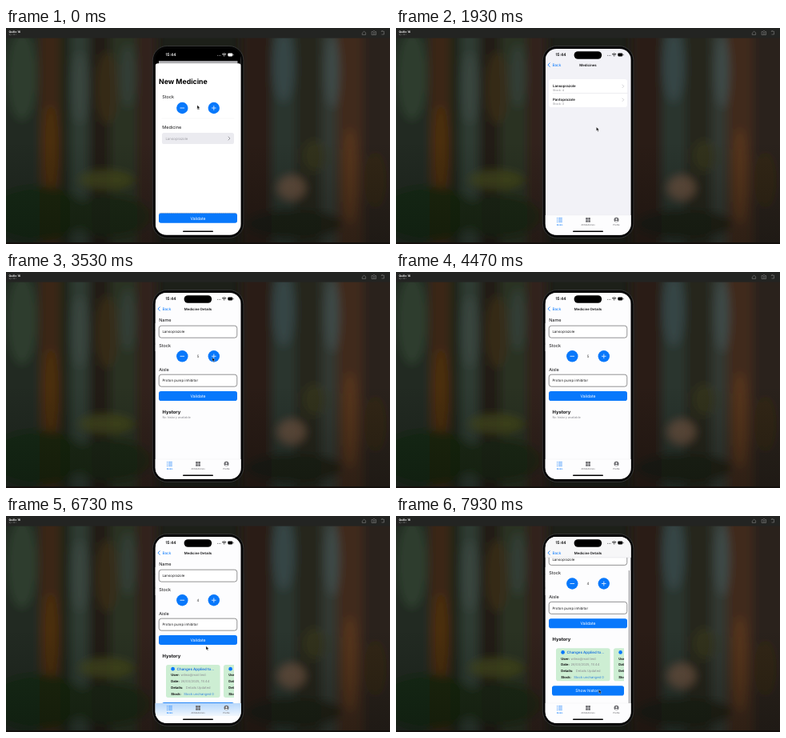
Recreate the animation shown at these times as an HTML page. Size 480 px wide and 270 px high, loop 8 s.

```html
<!DOCTYPE html>
<html lang="en">
<head>
<meta charset="utf-8">
<title>Medicine stock</title>
<style>
html, body { margin: 0; width: 100%; height: 100%; overflow: hidden; background: #0c100b; }
svg { display: block; width: 100vw; height: 100vh; }
text { font-family: Inter, Roboto, "Liberation Sans", sans-serif; white-space: pre; text-rendering: geometricPrecision; }
</style>
</head>
<body>
<svg id="stage" viewBox="0 0 480 270"></svg>
<script>
const LOOP = 8000, BLUE = '#0878fb', INK = '#101012', GREY = '#8b8b90';

const rect = (x, y, w, h, r, fill, extra = '') =>
  `<rect x="${x}" y="${y}" width="${w}" height="${h}" rx="${r}" fill="${fill}" ${extra}/>`;
const circle = (x, y, r, fill, extra = '') => `<circle cx="${x}" cy="${y}" r="${r}" fill="${fill}" ${extra}/>`;
const line = (d, color, width = .6, extra = '') =>
  `<path d="${d}" fill="none" stroke="${color}" stroke-width="${width}" stroke-linecap="round" stroke-linejoin="round" ${extra}/>`;
// y is the middle of the capital letters
const label = (x, y, size, str, fill = INK, weight = 400, anchor = 'start', extra = '') =>
  `<text x="${x}" y="${y + size * .36}" font-size="${size}" fill="${fill}" font-weight="${weight}" text-anchor="${anchor}" ${extra}>${str}</text>`;
const group = (id, body, extra = '') => `<g id="${id}" ${extra}>${body}</g>`;

// the whole phone display
const screen = (fill, r = 0, extra = '') => rect(186.7, 26, 107, 232.8, r, fill, extra);

const button = (x, y, w, h, str) =>
  rect(x, y, w, h, 2.8, BLUE) + label(x + w / 2, y + h / 2, 5.1, str, '#fff', 400, 'middle');
const field = (y, str) =>
  rect(191.2, y, 97.6, 15, 3, '#fff', 'stroke="#4a4a4c" stroke-width=".6"') + label(195.4, y + 7.7, 4.4, str);
const stepper = (y, id) =>
  circle(220.3, y, 7.2, BLUE) + circle(259.8, y, 7.2, BLUE) +
  line(`M217.9 ${y}h4.8M257.4 ${y}h4.8M259.8 ${y - 2.4}v4.8`, '#fff', .75) +
  label(240, y, 4.5, '0', '#333', 400, 'middle', `id="${id}"`);

function forest() {
  const trunks = [[-10, 52, '#222c20'], [42, 26, '#3a2515'], [68, 12, '#1f2318'], [80, 24, '#2f3a32'],
    [104, 26, '#241d13'], [130, 34, '#2b3024'], [164, 24, '#30241a'], [294, 38, '#2a1e15'],
    [332, 30, '#29342f'], [362, 32, '#26281f'], [394, 20, '#303930'], [414, 32, '#412a1b'], [446, 44, '#2a241b']];
  const patches = [[20, 60, 18, 55, '#324034'], [56, 150, 10, 55, '#50300f'], [92, 75, 11, 45, '#3a4842'],
    [126, 75, 14, 45, '#3b2d18'], [152, 60, 10, 40, '#33403a'], [40, 232, 60, 34, '#17290f'],
    [125, 190, 34, 12, '#444a1c'], [130, 235, 50, 26, '#1c2a12'], [347, 48, 13, 45, '#3a4a4c'],
    [357, 200, 17, 15, '#6e5541'], [408, 55, 9, 45, '#414f4d'], [430, 185, 9, 60, '#5c3820'],
    [385, 160, 14, 20, '#33361f'], [360, 245, 60, 18, '#1c1e12'], [462, 190, 14, 35, '#33261a']];
  return rect(0, 0, 480, 270, 0, '#1d2019') + `<g filter="url(#soft)">` +
    trunks.map(([x, w, c]) => rect(x, -20, w, 310, 0, c)).join('') +
    patches.map(([x, y, rx, ry, c]) =>
      `<ellipse cx="${x}" cy="${y}" rx="${rx}" ry="${ry}" fill="${c}" opacity=".8"/>`).join('') +
    `</g>` + rect(0, 12, 480, 258, 0, 'url(#dusk)');
}

function windowBar() {
  const c = '#8c8c8c';
  return rect(0, 0, 480, 12.6, 0, '#232422') + label(3.5, 4.6, 3.5, 'Quillo 16', '#f2f2f2', 700) +
    label(3.5, 8.5, 2.5, 'Sys 18.1', '#8a8a8a') +
    line('M445.6 6l2-2 2 2v2.4h-4zM457.5 4.5h1l.7-.8h1.6l.7.8h1v4h-5zM469.5 4.2h3v3.8h-2.6M469.5 4.2l1-1', c, .55) +
    circle(460, 6.4, 1, 'none', `stroke="${c}" stroke-width=".5"`) + rect(0, 268, 480, 2, 0, '#14100d');
}

function card(id, x, title, details, stock) {
  const rows = [['User:', 'wilma@mail.test', 12.2], ['Date:', '26/03/2025, 15:44', 12.2],
    ['Details:', details, 18.5], ['Stock:', stock, 16]];
  return group(id, rect(x, 186, 67.6, 41, 2.8, '#cdeed3') +
    circle(x + 8.6, 191.2, 2.3, BLUE) + label(x + 13.6, 191.2, 4.5, title, '#156fe0', 600) +
    rows.map(([key, value, dx], i) => {
      const y = 199 + i * 7.7;
      return label(x + 6.2, y, 4.1, key, INK, 700) +
        label(x + 6.2 + dx, y, 4.1, value, i == 3 ? '#2f82dc' : GREY);
    }).join(''));
}

const list = () => screen('#f2f2f7') +
  rect(191, 64, 98, 35, 3, '#fff') + line('M196 81.5h93', '#d4d4d8', .4) +
  ['Lansoprazole', 'Pantoprazole'].map((name, i) => {
    const y = 72 + i * 17;
    return label(196, y, 4.4, name, INK, 600) + label(196, y + 5.6, 3.6, 'Stock: ' + (4 - i), GREY) +
      line(`M283 ${y - 1}l1.8 1.8-1.8 1.8`, '#b8b8bc', .6);
  }).join('');

const details = () => screen('#fdfdfe') + group('scroller',
  label(191.2, 60.3, 5.5, 'Name') + field(67.2, 'Lansoprazole') +
  label(191.2, 91.7, 5.5, 'Stock') + stepper(105.3, 'stockValue') +
  label(191.2, 121.7, 5.5, 'Aisle') + field(128.2, 'Proton pump inhibitor') +
  button(191, 149, 98, 12, 'Validate') + label(195.5, 174.5, 5.8, 'Hystory', INK, 700) +
  label(195.5, 181.2, 3.8, 'No history available', GREY, 400, 'start', 'id="empty"') +
  group('history',
    `<g clip-path="url(#cards)">` + card('firstCard', 200, 'Increased stock of p...', 'Stock changed f...', '4 &#8594; 5') +
    group('laterCards', card('applied', 200, 'Changes Applied to...', 'Details Updated', 'Stock unchanged 0') +
      card('second', 272, 'Increased stock of p...', 'Stock changed', '4')) + `</g>` +
    button(195, 233, 90, 12.3, 'Show history')));

const tabBar = () => rect(186, 234, 108, 26, 0, '#fdfdfe', 'id="tabBase"') +
  rect(186, 234, 108, 16, 0, 'url(#tint)', 'id="tabTint"') + line('M187 234h106', '#e2e2e5', .25) +
  line('M203.3 237.8h4.2M203.3 240h4.2M203.3 242.2h4.2', BLUE, .7) +
  [237.8, 240, 242.2].map(y => circle(201.6, y, .55, BLUE)).join('') +
  [237.2, 240.3].map(y => [237.2, 240.3].map(x => rect(x, y - .1, 2.6, 2.6, .4, '#69696d')).join('')).join('') +
  circle(275.5, 239.8, 3, '#69696d') + circle(275.5, 238.9, 1, '#fff') +
  `<path d="M273.6 241.9q1.9-2.4 3.8 0q-1.9 1.2-3.8 0" fill="#fff"/>` +
  [[204.5, 'Aisles', BLUE], [240, 'All Medicines', '#77777b'], [275.5, 'Profile', '#77777b']]
    .map(([x, s, c]) => label(x, 245.9, 2.7, s, c, 500, 'middle')).join('');

const navBar = () => rect(186, 26, 108, 26, 0, '#f7f7f8', 'id="navFill"') +
  line('M187 52h106', '#c9c9cc', .3, 'id="navLine"') +
  line('M192.2 43.8l-2.2 2.3 2.2 2.3', BLUE, .8) + label(195.4, 46.4, 4.7, 'Back', BLUE) +
  label(240, 46.2, 4.3, 'Medicine Details', INK, 600, 'middle', 'id="detailTitle"') +
  label(240, 46.2, 4.3, 'Medicines', INK, 600, 'middle', 'id="listTitle"');

const sheet = () => rect(186.7, 44.3, 107, 230, 3.2, '#fff') +
  label(191, 66.6, 8.75, 'New Medicine', '#000', 700) +
  label(195.3, 86.5, 5.5, 'Stock') + stepper(100, 'newValue') + line('M195 113h90', '#ededf0', .35) +
  label(195.3, 124.2, 5.5, 'Medicine') + rect(195, 131, 90, 14, 2.6, '#ebebf0') +
  label(199.4, 138.1, 4.4, 'Lansoprazole', '#9c9ca2') + line('M278 136l2 2-2 2', '#77777c', .7) +
  button(191, 231.6, 98, 12.2, 'Validate') +
  line('M192 231.4h96', '#5d6a80', .4, 'stroke-dasharray="1 1.4"');

const statusBar = () => group('status',
  label(206, 33.7, 4.9, '15:44', 'currentColor', 600, 'middle') +
  [264.5, 266.3, 268.1].map(x => circle(x, 34.2, .45, 'currentColor')).join('') +
  line('M270.4 32.6q2.3-1.8 4.6 0M271.4 33.8q1.3-1 2.6 0M272.7 35.1h.1', 'currentColor', .8) +
  rect(277.3, 31.5, 6, 3.9, 1.1, 'currentColor') + rect(283.8, 32.7, .6, 1.5, .3, 'currentColor'));

const stage = document.getElementById('stage');
stage.innerHTML = `<defs>
  <filter id="soft" x="-10%" y="-10%" width="120%" height="120%"><feGaussianBlur stdDeviation="5.5"/></filter>
  <linearGradient id="dusk" x2="0" y2="1"><stop offset=".5" stop-color="#050805" stop-opacity="0"/>
    <stop offset="1" stop-color="#050704" stop-opacity=".3"/></linearGradient>
  <linearGradient id="tint" x2="0" y2="1"><stop offset="0" stop-color="#a9d0fb"/><stop offset="1" stop-color="#eff6fd"/></linearGradient>
  <clipPath id="screen">${screen('#fff', 14)}</clipPath>
  <clipPath id="cards">${rect(195, 180, 90, 52, 0, '#fff')}</clipPath></defs>` +
  forest() + windowBar() +
  rect(182.4, 60, 1.2, 14, .5, '#222') + rect(296.6, 72, 1.2, 22, .5, '#222') +
  rect(183.3, 22.5, 113.6, 239.9, 18, '#050505', 'stroke="#454747" stroke-width=".7"') +
  `<g clip-path="url(#screen)">` + screen('#000') +
  group('back', list() + screen('#000', 0, 'id="dim"')) +
  group('details', details()) + group('nav', navBar()) + group('tabs', tabBar()) +
  rect(290.9, 68, 1.1, 166, .5, '#77777a', 'id="scrollBar"') +
  group('sheet', sheet()) + statusBar() +
  rect(222.6, 29.2, 34.6, 9.6, 4.8, '#000') + rect(221, 253.4, 38, 1.5, .75, '#000') + `</g>` +
  group('cursor', '<path d="M0 0v4.6l1.1-1 .8 1.8.8-.4-.8-1.7h1.5z" fill="#080808" stroke="#eee" stroke-width=".3"/>');

const el = {};
stage.querySelectorAll('[id]').forEach(node => el[node.id] = node);

const clamp = v => Math.min(1, Math.max(0, v));
const smooth = p => p * p * (3 - 2 * p);
const mix = (a, b, p) => a + (b - a) * p;
const span = (t, from, length) => clamp((t - from) / length);

// y of cubic-bezier(.2, .8, .2, 1) at x
function glide(x) {
  if (x <= 0 || x >= 1) return clamp(x);
  let lo = 0, hi = 1;
  for (let i = 0; i < 20; i++) {
    const s = (lo + hi) / 2, r = 1 - s;
    if (.6 * s * r * r + .6 * s * s * r + s * s * s < x) lo = s; else hi = s;
  }
  return 2.4 * lo * (1 - lo) ** 2 + 3 * lo * lo * (1 - lo) + lo ** 3;
}

function along(track, t) {
  const i = track.findIndex(step => step[0] > t);
  if (i < 0) return track[track.length - 1].slice(1);
  const a = track[i - 1], b = track[i], p = smooth((t - a[0]) / (b[0] - a[0]));
  return a.slice(1).map((v, k) => mix(v, b[k + 1], p));
}

const pointer = [[0, 239, 96.5], [240, 259, 100], [880, 259, 100], [1290, 264.6, 233], [1480, 264.6, 233],
  [2200, 244, 74], [2600, 244, 74], [2850, 257.5, 107], [3700, 258, 107], [4350, 222, 106],
  [4950, 222, 106], [5420, 243, 157], [5620, 244, 158], [5760, 244.7, 162], [6700, 250, 163],
  [7250, 252.7, 125.5], [7470, 252.7, 125.5], [7880, 253.5, 217], [8000, 253.5, 217]];
const scrolling = [[0, 0], [6720, 0], [7250, 34], [7430, 34], [7820, 20.8], [8000, 20.8]];

const move = (id, x, y, more = '') => el[id].setAttribute('transform', `translate(${x} ${y}) ${more}`);
const fade = (id, opacity) => el[id].setAttribute('opacity', opacity);

function render(t) {
  const added = [300, 470, 640, 810].filter(at => t >= at).length;
  el.newValue.textContent = added;
  el.stockValue.textContent = t >= 3300 && t < 4800 ? 5 : 4;

  const drop = glide(span(t, 1420, 520)), push = glide(span(t, 2635, 500));
  const k = mix(.92, 1, drop), shift = -32 * push;
  move('sheet', 0, 220 * drop);
  move('back', 240 * (1 - k) + shift, mix(41.2, 26, drop) - 26 * k, `scale(${k})`);
  fade('dim', drop < 1 ? .28 * (1 - drop) : .1 * push);
  el.status.setAttribute('color', drop > .5 ? '#000' : '#fff');
  fade('nav', drop);
  fade('tabs', drop);

  move('details', 107 * (1 - push), 0);
  move('detailTitle', 58 * (1 - push), 0);
  fade('detailTitle', push);
  move('listTitle', -40 * push, 0);
  fade('listTitle', 1 - push);

  const scroll = along(scrolling, t)[0], bar = clamp(scroll / 4), over = Math.max(0, scroll - 20.8) * .9;
  move('scroller', 0, -scroll);
  fade('navFill', bar);
  fade('navLine', bar);
  fade('scrollBar', bar * .8);
  el.scrollBar.setAttribute('y', mix(54, 68, clamp(scroll / 20.8)) + over);
  el.scrollBar.setAttribute('height', 166 - over);

  const shown = span(t, 5640, 150), applied = span(t, 5830, 200);
  fade('history', shown);
  fade('empty', 1 - shown);
  fade('firstCard', (1 - applied) * .85);
  fade('laterCards', applied);
  fade('tabTint', shown * (1 - clamp(scroll / 12)) * .85);
  fade('tabBase', .97);

  const [x, y] = along(pointer, t);
  move('cursor', x, y);
  fade('cursor', t > 4250 && t < 4600 ? 0 : 1);
}

const start = performance.now();
(function tick() {
  render((performance.now() - start) % LOOP);
  requestAnimationFrame(tick);
})();
</script>
</body>
</html>
```
